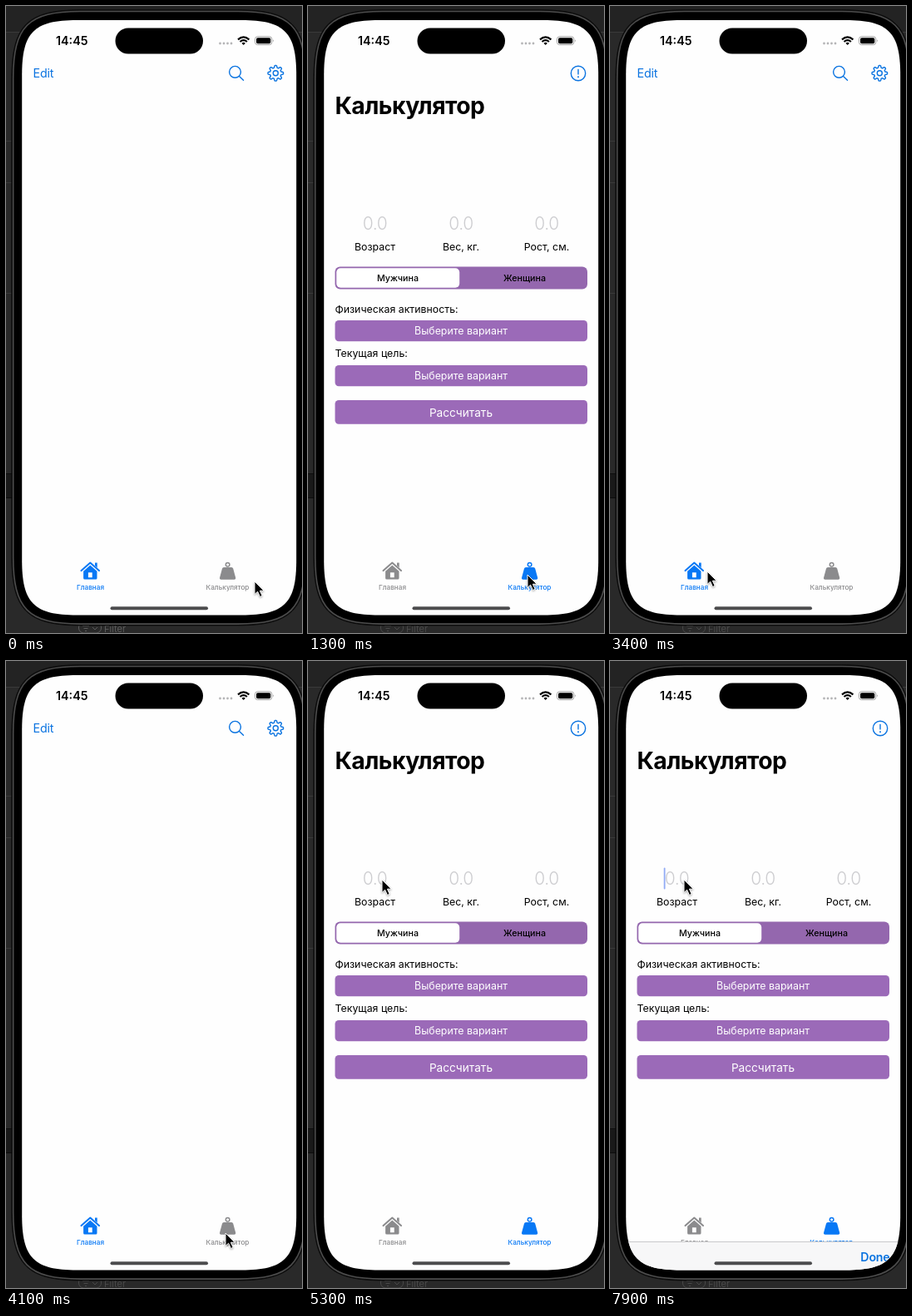
These frames come from a looping animation (356 px wide and 754 px high, 8000 ms). An HTML page:

```html
<!DOCTYPE html>
<html lang="ru">
<head>
<meta charset="utf-8">
<style>
html, body { margin: 0; width: 100%; height: 100%; overflow: hidden; background: #272727; }
svg { display: block; width: 356px; height: 754px; font-family: Inter, Roboto, sans-serif; }
.mid { text-anchor: middle; }
.label { font-size: 12.35px; }
.hint { font-size: 21px; font-weight: 300; fill: #cdcdd0; letter-spacing: -.4px; }
.seg { font-size: 10.7px; font-weight: 500; }
.pick { font-size: 12.4px; fill: #fff; }
.tab { color: #8b8b8d; fill: currentColor; }
.tab.on { color: #0878f5; }
.tab text { font-size: 8.2px; font-weight: 500; }
.line { fill: none; stroke: #0a73e0; stroke-width: 1.4; stroke-linecap: round; stroke-linejoin: round; }
.blue { fill: #0a73e0; }
.btn { fill: #9b6ab8; }
</style>
</head>
<body>
<svg viewBox="0 0 356 754">
  <defs>
    <clipPath id="screen"><path id="glass"/></clipPath>
  </defs>

  <!-- desktop behind the phone -->
  <rect width="356" height="754" fill="#292929"/>
  <rect width="356" height="31" fill="#232323"/>
  <path d="M0 31.5H356M0 162.5H8M0 212.5H8M0 345.5H8" stroke="#3a3a3a"/>
  <rect y="562" width="8" height="29" fill="#191919"/>
  <path d="M0 562.5H8M0 591.5H8" stroke="#0c0c0c"/>
  <g id="filter" fill="none" stroke="#777">
    <rect x="87.500" y="741" width="27" height="13" rx="6"/>
    <path d="M92 745.500h8M93.500 748.500h5M95 751.500h2M104 747l3 3 3-3"/>
    <text x="118" y="753" font-size="11" fill="#777" stroke="none">Filter</text>
  </g>

  <!-- phone body -->
  <path id="shell" fill="#111" stroke="#0a0a0a"/>
  <path id="rim" stroke="#4c4c4c" stroke-width="1.600"/>

  <g clip-path="url(#screen)">
    <rect x="19" y="16" width="331" height="718" fill="#fefefe"/>

    <g id="home">
      <text x="32.500" y="86" font-size="14.300" class="blue" letter-spacing="-.2">Edit</text>
      <g class="line">
        <circle cx="275.500" cy="79.300" r="6.900"/>
        <path d="M280.500 84.500L285.500 89.300"/>
        <path id="gear"/>
        <circle cx="324.300" cy="80.800" r="3"/>
      </g>
    </g>

    <g id="calc">
      <circle cx="325" cy="81" r="8.700" class="line"/>
      <path d="M325 76.500V82" class="line"/>
      <circle cx="325" cy="85.200" r="1" class="blue"/>
      <text x="32.500" y="130" font-size="28.300" font-weight="700" letter-spacing="-.5">Калькулятор</text>
      <g class="mid">
        <g class="hint">
          <text x="80.500" y="269">0.0</text>
          <text x="184" y="269">0.0</text>
          <text x="287" y="269">0.0</text>
        </g>
        <g class="label">
          <text x="80.500" y="293.500">Возраст</text>
          <text x="184" y="293.500">Вес, кг.</text>
          <text x="287" y="293.500">Рост, см.</text>
        </g>
        <rect x="32.500" y="313.500" width="303.500" height="26.900" rx="6" fill="#9467ae"/>
        <rect x="34.200" y="315.200" width="148" height="23.500" rx="5" fill="#fff"/>
        <text x="108" y="331" class="seg">Мужчина</text>
        <text x="260.500" y="331" class="seg">Женщина</text>
        <g class="btn">
          <rect x="32.500" y="378" width="303.500" height="25.200" rx="4.500"/>
          <rect x="32.500" y="432" width="303.500" height="25.200" rx="4.500"/>
          <rect x="32.500" y="474" width="303.500" height="28.800" rx="4.500"/>
        </g>
        <text x="184" y="395.300" class="pick">Выберите вариант</text>
        <text x="184" y="449" class="pick">Выберите вариант</text>
        <text x="184" y="493.700" font-size="13.700" fill="#fff">Рассчитать</text>
      </g>
      <text x="32.500" y="368.500" class="label">Физическая активность:</text>
      <text x="32.500" y="422.300" class="label">Текущая цель:</text>
      <rect id="caret" x="64.700" y="248.500" width="1.800" height="26" rx=".9" fill="#91abf5"/>
    </g>

    <g id="homeTab" class="tab">
      <path d="M90.500 679L101.300 669.500L112 679" fill="none" stroke="currentColor" stroke-width="2" stroke-linecap="round" stroke-linejoin="round"/>
      <path d="M107 669.500h2.700v6l-2.700-2.400z"/>
      <path fill-rule="evenodd" d="M101.300 672.500L109.500 679.800V688q0 1.500-1.500 1.500H94.600q-1.500 0-1.500-1.500V679.800ZM98.900 681.200v6h4.800v-6z"/>
      <text x="101.500" y="701.500" class="mid">Главная</text>
    </g>
    <g id="calcTab" class="tab">
      <circle cx="266.600" cy="671.800" r="2.300" fill="none" stroke="currentColor" stroke-width="1.500"/>
      <path d="M262 675h9.200q1.600 0 2 1.500l2.900 10.800q.6 2.400-1.700 2.400H258.800q-2.300 0-1.700-2.400L260 676.500q.4-1.500 2-1.500z"/>
      <text x="266.500" y="701.500" class="mid">Калькулятор</text>
    </g>

    <g id="bar">
      <rect x="19" width="331" height="60" fill="#f7f7f8"/>
      <path d="M19 .5H350" stroke="#c9c9cb"/>
      <text x="336.500" y="23.800" text-anchor="end" font-size="14.200" font-weight="600" class="blue" letter-spacing="-.2">Done</text>
    </g>
    <rect x="125.500" y="722.300" width="117.500" height="4" rx="2" fill="#4c4c4e"/>

    <!-- status bar -->
    <text x="60" y="47" font-size="14.300" font-weight="600">14:45</text>
    <rect x="131.500" y="26.500" width="105.500" height="31" rx="15.500"/>
    <path d="M257.500 45h14" stroke="#b5b5b7" stroke-width="2.800" stroke-linecap="round" stroke-dasharray="0 4.500"/>
    <g fill="none" stroke="#000" stroke-width="2.200">
      <path d="M279 40.300q6.700-5.900 13.400 0M281.500 43q4.200-3.600 8.400 0"/>
      <path d="M285.700 47l-2.200-2.200q2.200-1.900 4.400 0z" fill="#000" stroke="none"/>
    </g>
    <rect x="299.500" y="36.800" width="20.300" height="9.800" rx="3" fill="none" stroke="#999" stroke-width=".9"/>
    <rect x="301" y="38.200" width="17.300" height="7" rx="1.800"/>
    <path d="M321 40.200q1.800 1.500 0 3z" fill="#999"/>
  </g>

  <path id="mouse" d="M0 0V15.500L3.600 12.200L6.500 18.500L9.200 17.300L6.400 11.200H11.200Z" stroke="#fff" stroke-linejoin="round" style="filter:drop-shadow(0 1px 1px #0005)"/>
</svg>
<script>
const $ = id => document.getElementById(id);
const show = (id, on) => $(id).setAttribute('display', on ? 'inline' : 'none');
const move = (id, x, y) => $(id).setAttribute('transform', `translate(${x} ${y})`);

// screen outline with smooth corners, grown outwards by g
function outline(id, g) {
  const l = 19.2 - g, r = 349.2 + g, t = 17 - g, b = 732.6 + g;
  const e = 66 + g * 1.4, c = 14.5 + g * .32;
  $(id).setAttribute('d', `M${l + e} ${t}H${r - e}C${r - c} ${t} ${r} ${t + c} ${r} ${t + e}
    V${b - e}C${r} ${b - c} ${r - c} ${b} ${r - e} ${b}
    H${l + e}C${l + c} ${b} ${l} ${b - c} ${l} ${b - e}
    V${t + e}C${l} ${t + c} ${l + c} ${t} ${l + e} ${t}Z`);
}
outline('glass', 0);
outline('rim', 10.5);
outline('shell', 12.3);

// cog outline: eight flattened waves around a circle
const cog = [];
for (let i = 0; i < 96; i++) {
  const a = i / 96 * 2 * Math.PI;
  const r = 8 + 1.3 * Math.tanh(2.5 * Math.cos(8 * a));
  cog.push(`${(324.3 + r * Math.cos(a)).toFixed(2)} ${(80.8 + r * Math.sin(a)).toFixed(2)}`);
}
$('gear').setAttribute('d', `M${cog.join('L')}Z`);

// pointer path: time, x, y
const path = [
  [0, 299, 692], [100, 292, 690], [200, 279, 689], [300, 271, 687],
  [600, 271, 687], [700, 269, 680], [900, 264, 684],
  [2800, 264, 684], [2900, 262, 683], [3000, 226, 682], [3100, 151, 680], [3200, 117, 680],
  [3500, 117, 680], [3600, 120, 680], [3800, 176, 683], [4000, 253, 687], [4100, 264, 688],
  [4300, 264, 688], [4400, 257, 673], [4600, 205, 566], [4800, 133, 396],
  [5000, 93, 287], [5100, 89, 270], [5300, 89, 263], [8000, 89, 263]
];

function pointer(t) {
  const i = path.findIndex(p => p[0] > t);
  const [t0, x0, y0] = path[i - 1], [t1, x1, y1] = path[i];
  const k = (t - t0) / (t1 - t0);
  return [x0 + (x1 - x0) * k, y0 + (y1 - y0) * k];
}

function draw(now) {
  const t = Math.floor(now % 8000 / 100) * 100;
  const calc = t >= 1300 && t < 3400 || t >= 4300;
  show('home', !calc);
  show('calc', calc);
  $('homeTab').classList.toggle('on', !calc);
  $('calcTab').classList.toggle('on', calc);
  show('caret', t >= 7300);
  show('bar', t >= 7700);
  move('bar', 0, 698 + (7900 - t) * .15);
  $('filter').setAttribute('opacity', t < 1100 ? .65 : .4);
  move('mouse', ...pointer(t));
}

const start = performance.now();
function tick() {
  draw(Math.max(0, performance.now() - start));
  requestAnimationFrame(tick);
}
tick();
</script>
</body>
</html>
```
